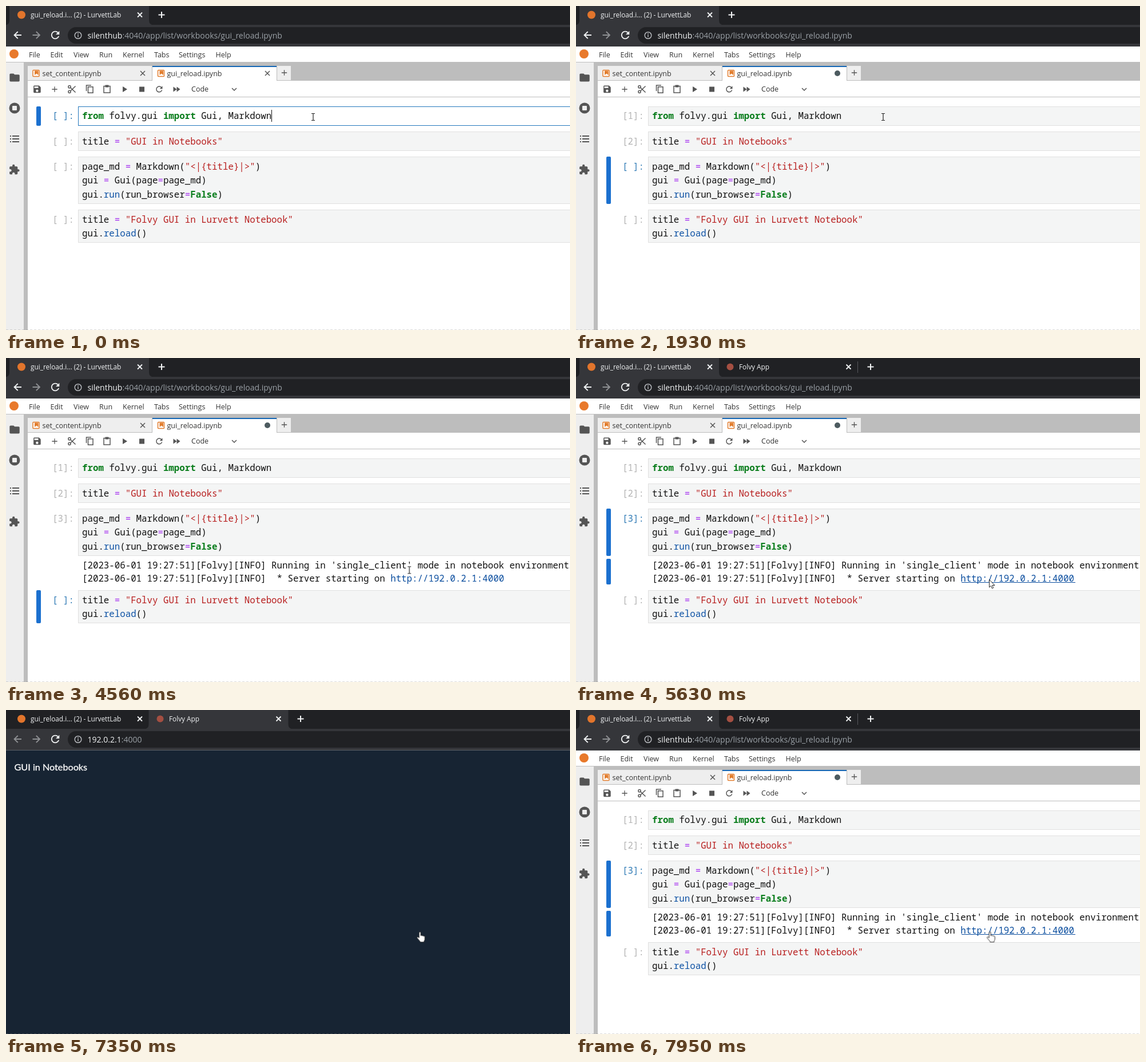
Animation, 986 px wide and 568 px high, one loop 8000 ms. Source, as an HTML page:

```html
<!DOCTYPE html>
<html lang="en">
<head>
<meta charset="utf-8">
<title>Notebook demo</title>
<style>
html,body{margin:0;width:100%;height:100%;overflow:hidden;background:#fff}
svg.stage{display:block;width:986px;height:568px}
text{white-space:pre;font:12.5px "Open Sans","Noto Sans",sans-serif;fill:#333}
.tab{font-size:11.8px;fill:#f1f3f4}
.url{font-size:14px;fill:#f1f3f4}
.page{font:16.2px Lato,sans-serif;fill:#fff;stroke:#fff;stroke-width:.3}
.code text{font:15.78px "Noto Sans Mono","DejaVu Sans Mono",monospace;fill:#111}
.code .gray{fill:#b3b3b3}
.code .blue{fill:#2f7ab5}
.code .link{fill:#0a4d9e}
.k{fill:#0a7d1c;font-weight:bold}
.o{fill:#a32cf0}
.s{fill:#b81f1f}
.p{fill:#0f53a5}
.dim{fill:#9aa0a6}
.box{fill:#f4f5f5;stroke:#e0e0e0}
.bar{fill:#1b70cf}
.icon{fill:#555}
.line{fill:none;stroke:#555;stroke-width:1.5}
.white{fill:none;stroke:#f1f3f4;stroke-width:1.8}
.faded{opacity:.48}

/* One 8 s clock; hard switches hold until the next keyframe. */
.t{animation:8s step-end infinite}
.caret{animation-name:caret}
.run1{animation-name:run1}
.busy1{animation-name:busy1}
.done1{animation-name:done1}
.clean{animation-name:clean}
.dirty{animation-name:dirty}
.sel2{animation-name:sel2}
.done2{animation-name:done2}
.idle3{animation-name:idle3}
.sel3{animation-name:sel3}
.busy3{animation-name:busy3}
.done3{animation-name:done3}
.again3{animation-name:again3}
.idle4{animation-name:idle4}
.sel4{animation-name:sel4}
.output{animation-name:output}
.cell4{animation-name:shift4}
.under{animation-name:under}
.favicon{animation-name:favicon}
.dark{animation-name:dark}
.ibeam{animation-name:ibeam}
.hand{animation-name:hand}
.arrow{animation-name:arrow}
.mouse{animation:move 8s infinite}
.newtab{animation:newtab 8s infinite}
@keyframes caret{0%,5%{opacity:1}1.625%,8.25%,to{opacity:0}}
@keyframes run1{0%{opacity:1}11.5%,to{opacity:0}}
@keyframes busy1{0%,19.125%,to{opacity:0}11.5%{opacity:1}}
@keyframes done1{0%{opacity:0}19.125%,to{opacity:1}}
@keyframes clean{0%{opacity:1}13.375%,to{opacity:0}}
@keyframes dirty{0%{opacity:0}13.375%,to{opacity:1}}
@keyframes sel2{0%,24.125%,to{opacity:0}11.5%{opacity:1}}
@keyframes done2{0%{opacity:0}24.125%,to{opacity:1}}
@keyframes idle3{0%{opacity:1}24.125%,to{opacity:0}}
@keyframes sel3{0%,33.375%,to{opacity:0}24.125%{opacity:1}}
@keyframes busy3{0%,35.875%,to{opacity:0}33.375%{opacity:1}}
@keyframes done3{0%,62.75%,to{opacity:0}35.875%{opacity:1}}
@keyframes again3{0%{opacity:0}62.75%,to{opacity:1}}
@keyframes idle4{0%,62.75%,to{opacity:1}33.375%{opacity:0}}
@keyframes sel4{0%,62.75%,to{opacity:0}33.375%{opacity:1}}
@keyframes output{0%{opacity:0}34.625%,to{opacity:1}}
@keyframes shift4{0%{transform:none}34.625%,to{transform:translateY(50px)}}
@keyframes under{0%{opacity:0}57.875%,to{opacity:1}}
@keyframes favicon{0%,21.625%,38.375%,to{r:7px}15.875%,35.875%{r:8px}}
@keyframes dark{0%,92.75%,to{opacity:0}72.875%{opacity:1}}
@keyframes ibeam{0%{opacity:1}57.875%,to{opacity:0}}
@keyframes hand{0%,69.5%{opacity:0}57.875%,91.875%,to{opacity:1}}
@keyframes arrow{0%,91.875%,to{opacity:0}69.5%{opacity:1}}
@keyframes move{
  0%{transform:translate(537px,194px)}
  49.125%{transform:translate(537px,194px);animation-timing-function:steps(11,jump-start)}
  58.75%,to{transform:translate(722px,389px)}
}
@keyframes newtab{
  0%,63.625%{transform:none;animation-timing-function:ease-out}
  67.125%,to{transform:translateX(243px)}
}
</style>
</head>
<body>
<svg class="stage" viewBox="0 0 986 568">
<defs>
  <path id="cross" d="M-4-4 4 4M4-4-4 4"/>
  <path id="plus" d="M-5.5 0h11M0-5.5v11"/>
  <path id="tabshape" d="M-2 33.5Q6 33 6 25V0H250V25Q250 33 258 33.5Z" fill="#35363a"/>
  <path id="reload" d="M17.65 6.35C16.2 4.9 14.21 4 12 4c-4.42 0-7.99 3.58-7.99 8s3.57 8 7.99 8c3.73 0 6.84-2.55 7.73-6h-2.08c-.82 2.33-3.04 4-5.65 4-3.31 0-6-2.69-6-6s2.69-6 6-6c1.66 0 3.14.69 4.22 1.78L13 11h7V4l-2.35 2.35z"/>
  <path id="back" d="M6.5 0h-12.5M.2-6-6 0 .2 6"/>
  <g id="book">
    <rect x="-5.5" y="-5.5" width="11" height="11" rx="1" fill="#fff" stroke="#e27d2d" stroke-width="1.5"/>
    <path d="M-2.5-4.5H4V3L.8.5-2.5 3Z" fill="#e27d2d"/>
  </g>
  <g id="tab1">
    <circle class="t favicon" cx="27" cy="15.5" r="7" fill="#e2752c"/>
    <text class="tab" x="43" y="19.5">gui_reload.i... (2) - LurvettLab</text>
    <use href="#cross" class="white" x="234" y="15.5"/>
  </g>
  <g id="tab2">
    <circle cx="269.5" cy="15.5" r="6" fill="#a44f42"/>
    <text class="tab" x="285" y="19.5">Folvy App</text>
    <use href="#cross" class="white" x="476.5" y="15.5"/>
  </g>
  <g id="navbar">
    <rect y="33" width="986" height="38" fill="#35363a"/>
    <rect x="108" y="37" width="920" height="29" rx="14.5" fill="#202124"/>
    <use href="#back" class="white faded" transform="translate(53 51) scale(-1 1)"/>
    <use href="#reload" transform="translate(75.3 40.2) scale(.9)" fill="#f1f3f4"/>
    <g fill="none" stroke="#b4b7bb" stroke-width="1.5">
      <circle cx="126" cy="51.5" r="5.8"/>
      <path d="M126 50.5v4M126 47.8v1.6"/>
    </g>
  </g>
</defs>

<g>
  <rect width="986" height="34" fill="#202124"/>
  <use href="#tab2"/>
  <g class="newtab">
    <rect x="250" width="260" height="33" fill="#202124"/>
    <path d="M249.5 6v20" stroke="#55575b"/>
    <use href="#plus" class="white" x="272" y="15.5" style="stroke-width:2"/>
  </g>
  <use href="#tabshape"/>
  <use href="#tab1"/>
  <use href="#navbar"/>
  <use href="#back" class="white" x="20.5" y="51"/>
  <text class="url" x="142.5" y="56.5">silenthub<tspan class="dim">:4040/app/list/workbooks/gui_reload.ipynb</tspan></text>
</g>

<g>
  <rect y="71" width="986" height="497" fill="#fff"/>
  <rect y="98" width="986" height="33" fill="#bdbdbd"/>
  <rect x="31" y="98" width="7" height="470" fill="#bdbdbd"/>
  <rect y="99" width="31" height="469" fill="#eee"/>
  <circle cx="14" cy="84" r="8" fill="#e8792b"/>
  <text x="40" y="90">File</text>
  <text x="77.5" y="90">Edit</text>
  <text x="118" y="90">View</text>
  <text x="163" y="90">Run</text>
  <text x="204" y="90">Kernel</text>
  <text x="259" y="90">Tabs</text>
  <text x="302" y="90">Settings</text>
  <text x="366.5" y="90">Help</text>

  <rect x="38" y="105" width="217" height="25" fill="#eee"/>
  <rect x="256" y="105" width="217" height="27" fill="#fff"/>
  <rect x="256" y="105" width="217" height="2" fill="#1566b5"/>
  <rect x="474" y="105" width="24" height="25" fill="#eee"/>
  <rect x="38" y="131" width="948" height="28" fill="#fff"/>
  <use href="#book" x="52.5" y="118"/>
  <use href="#book" x="271" y="118"/>
  <text x="63.5" y="123">set_content.ipynb</text>
  <text x="281.5" y="123">gui_reload.ipynb</text>
  <use href="#cross" class="line" x="239" y="118"/>
  <use href="#cross" class="line t clean" x="457" y="118"/>
  <circle class="t dirty" cx="457" cy="118" r="5" fill="#4d5b60"/>
  <use href="#plus" class="line" transform="translate(486.5 117) scale(.85)"/>

  <path d="M38 159.5H986" stroke="#bdbdbd"/>
  <g class="icon">
    <path transform="translate(46 137.5) scale(.7)" d="M17 3H5c-1.1 0-2 .9-2 2v14c0 1.1.9 2 2 2h14c1.1 0 2-.9 2-2V7l-4-4zm-5 16c-1.7 0-3-1.3-3-3s1.3-3 3-3 3 1.3 3 3-1.3 3-3 3zm3-10H5V5h10v4z"/>
    <path d="M204 141v10l8-5zM233 141.5h9v9h-9zM292.5 141.5v9l6-4.5zM298.5 141.5v9l6-4.5z"/>
    <use href="#reload" transform="translate(259.5 137.5) scale(.7)"/>
    <path transform="translate(4.6 115) scale(.87)" d="M10 4H4c-1.1 0-2 .9-2 2v12c0 1.1.9 2 2 2h16c1.1 0 2-.9 2-2V8c0-1.1-.9-2-2-2h-8z"/>
    <path transform="translate(4.5 277) scale(.83)" d="M20.5 11H19V7c0-1.1-.9-2-2-2h-4V3.5C13 2.1 11.9 1 10.5 1S8 2.1 8 3.5V5H4c-1.1 0-2 .9-2 2v3.8h1.5c1.5 0 2.7 1.2 2.7 2.7s-1.2 2.7-2.7 2.7H2V20c0 1.1.9 2 2 2h3.8v-1.5c0-1.5 1.2-2.7 2.7-2.7s2.7 1.2 2.7 2.7V22H17c1.1 0 2-.9 2-2v-4h1.5c1.4 0 2.5-1.1 2.5-2.5S21.9 11 20.5 11z"/>
    <circle cx="15" cy="179" r="9.5"/>
    <rect x="11" y="175" width="8" height="8" rx="1" fill="#eee"/>
    <path d="M7 227h2v2H7zm0 5h2v2H7zm0 5h2v2H7zM11 227h12v2H11zm0 5h12v2H11zm0 5h12v2H11z"/>
  </g>
  <g class="line">
    <use href="#plus" transform="translate(85 146) scale(.85)"/>
    <circle cx="111" cy="141.7" r="2.1"/>
    <circle cx="111" cy="150.3" r="2.1"/>
    <path d="M112.7 143 121.5 151.5M112.7 149 121.5 140.5"/>
    <path d="M140.5 149v-10h8.5M143.5 141.7h8.5v10.6h-8.5z"/>
    <path d="M171 140.5h11v11.5h-11z"/>
    <path d="M173.5 140.5h6" style="stroke-width:4"/>
    <path d="M395 144l4 4 4-4"/>
  </g>
  <text x="324" y="150">Code</text>
</g>

<g class="code">
  <rect class="box" x="126.5" y="176.5" width="900" height="33"/>
  <g class="t run1">
    <rect x="126.5" y="176.5" width="900" height="33" fill="#fff" stroke="#2478bd"/>
    <rect class="bar" x="53" y="176" width="8" height="34" rx="2"/>
    <text class="blue" x="81" y="198">[ ]:</text>
  </g>
  <text class="gray t busy1" x="81" y="198">[*]:</text>
  <text class="gray t done1" x="81" y="198">[1]:</text>
  <text x="133" y="198"><tspan class="k">from</tspan> folvy.gui <tspan class="k">import</tspan> Gui, Markdown</text>
  <path class="t caret" d="M464.5 182v21" stroke="#111"/>

  <rect class="box" x="126.5" y="220.5" width="900" height="33"/>
  <text class="gray t run1" x="81" y="243">[ ]:</text>
  <g class="t sel2">
    <rect class="bar" x="53" y="220" width="8" height="34" rx="2"/>
    <text class="blue" x="81" y="243">[ ]:</text>
  </g>
  <text class="gray t done2" x="81" y="243">[2]:</text>
  <text x="133" y="243">title <tspan class="o">=</tspan> <tspan class="s">"GUI in Notebooks"</tspan></text>

  <rect class="box" x="126.5" y="264.5" width="900" height="82"/>
  <text class="gray t idle3" x="81" y="287">[ ]:</text>
  <g class="t sel3">
    <rect class="bar" x="53" y="264" width="8" height="83" rx="2"/>
    <text class="blue" x="81" y="287">[ ]:</text>
  </g>
  <text class="gray t busy3" x="81" y="287">[*]:</text>
  <text class="gray t done3" x="81" y="287">[3]:</text>
  <g class="t again3">
    <rect class="bar" x="53" y="264" width="8" height="83" rx="2"/>
    <rect class="bar" x="53" y="352" width="8" height="45" rx="2"/>
    <text class="blue" x="81" y="287">[3]:</text>
  </g>
  <text x="133" y="287">page_md <tspan class="o">=</tspan> Markdown(<tspan class="s">"&lt;|{title}|&gt;"</tspan>)</text>
  <text x="133" y="311">gui <tspan class="o">=</tspan> Gui(page<tspan class="o">=</tspan>page_md)</text>
  <text x="133" y="335.5">gui.<tspan class="p">run</tspan>(run_browser<tspan class="o">=</tspan><tspan class="k">False</tspan>)</text>

  <g class="t output">
    <text x="133" y="369">[2023-06-01 19:27:51][Folvy][INFO] Running in 'single_client' mode in notebook environments</text>
    <text x="133" y="391.5">[2023-06-01 19:27:51][Folvy][INFO]  * Server starting on <tspan class="link">http://192.0.2.1:4000</tspan></text>
    <path class="t under" d="M674 393.5H873" stroke="#0a4d9e" stroke-width="1.2"/>
  </g>

  <g class="t cell4">
    <rect class="box" x="126.5" y="357.5" width="900" height="57"/>
    <text class="gray t idle4" x="81" y="379.5">[ ]:</text>
    <g class="t sel4">
      <rect class="bar" x="53" y="357" width="8" height="58" rx="2"/>
      <text class="blue" x="81" y="379.5">[ ]:</text>
    </g>
    <text x="133" y="379.5">title <tspan class="o">=</tspan> <tspan class="s">"Folvy GUI in Lurvett Notebook"</tspan></text>
    <text x="133" y="404">gui.<tspan class="p">reload</tspan>()</text>
  </g>
</g>

<g class="t dark">
  <rect width="500" height="34" fill="#202124"/>
  <use href="#tabshape" x="243.5"/>
  <use href="#tab1"/>
  <use href="#tab2"/>
  <use href="#navbar"/>
  <use href="#back" class="white faded" x="20.5" y="51"/>
  <text class="url" x="142.5" y="56.5">192.0.2.1<tspan class="dim">:4000</tspan></text>
  <rect y="70" width="986" height="498" fill="#172433"/>
  <path d="M0 70.5H986" stroke="#5b6067"/>
  <text class="page" x="14.5" y="105.5">GUI in Notebooks</text>
</g>

<path d="M0 567.5H986" stroke="#888" stroke-opacity=".3" stroke-dasharray="4 3"/>

<g class="mouse">
  <path class="t ibeam" d="M-3-5.5h2.3L0-5 .7-5.5H3M-3 6.5h2.3L0 6 .7 6.5H3M0-5V6" fill="none" stroke="#222" stroke-width="1.2"/>
  <path class="t arrow" d="M.5-.5V13L3.5 10.3 5.4 14.9 7.7 13.9 5.8 9.5H10Z" fill="#fff" stroke="#111" stroke-width=".9"/>
  <path class="t hand" transform="translate(-4.4 -.5) scale(1.08)" d="M4.2 10V1.8a1.4 1.4 0 0 1 2.8 0V6.6c.3-.8 2.2-.8 2.4.3.5-.7 2.1-.5 2.2.6.7-.5 2-.1 2 1v3.6c0 1.2-.9 2.6-1.4 3.4v1.5H5.8V16C4.6 14.3 2.2 11.8 1 10.2c-.7-1.2.9-2.1 1.9-1.2z" fill="#fff" stroke="#111" stroke-width=".8"/>
</g>
</svg>
</body>
</html>
```
